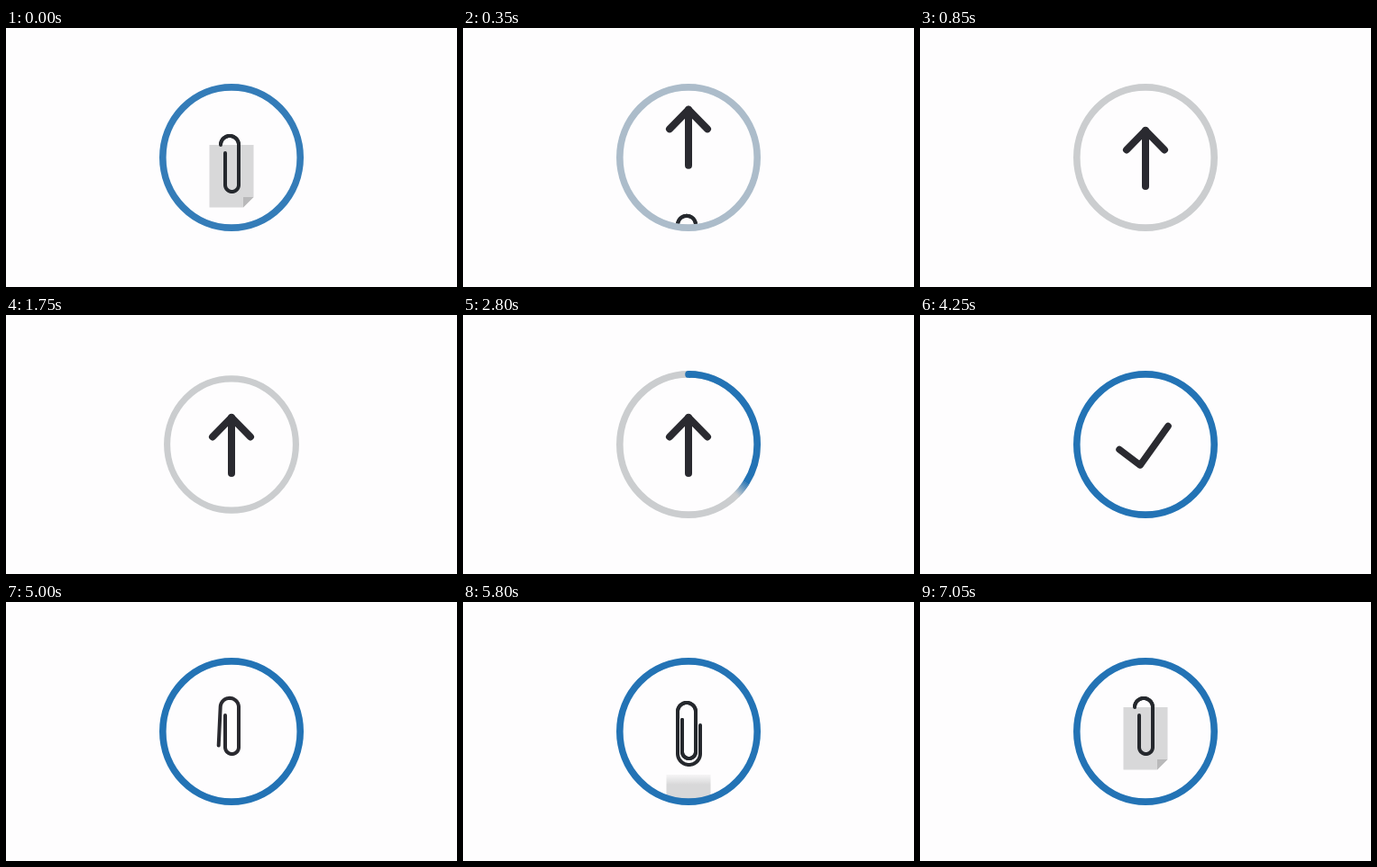
These frames come from a looping animation (500x288 px, 7.1 s). An HTML page with a canvas:

```html
<!DOCTYPE html>
<html lang="en">
<head>
<meta charset="utf-8">
<title>Attachment upload</title>
<style>
html, body { margin: 0; width: 100%; height: 100%; overflow: hidden; background: #fefdfe; }
canvas { display: block; }
</style>
</head>
<body>
<canvas id="stage" width="500" height="288"></canvas>
<script>
const ctx = document.getElementById('stage').getContext('2d');
const LOOP = 7100, CX = 250, CY = 144, RADIUS = 76.2, STRETCH = 1.025;
const BG = '#fefdfe', INK = '#2a2a30', CLIP_INK = '#25282d';
const BLUE = [35, 115, 181], GREY = [203, 205, 207];
const TAU = Math.PI * 2, SCROLL = 125;

// Clip as a spiral of [length, turn] pieces, from the inner end outwards
const CLIP = [
  [35.5, 0], [7.5 * Math.PI, -Math.PI], [44.5, 0], [10 * Math.PI, -Math.PI],
  [46.5, 0], [12.5 * Math.PI, -Math.PI], [31.5, 0]
];
const CLIP_LEN = CLIP.reduce((sum, s) => sum + s[0], 0);
const FRONT_LEN = CLIP.slice(0, 4).reduce((sum, s) => sum + s[0], 0);

const ARROW = [[229, 135.5], [250, 114], [271, 135.5]];
const CHECK = [[221, 149.5], [244, 167], [275, 123.5]];

const lerp = (a, b, k) => a + (b - a) * k;
const part = (t, a, b) => Math.min(1, Math.max(0, (t - a) / (b - a)));
const sine = u => 0.5 - 0.5 * Math.cos(Math.PI * u);
const rgb = c => `rgb(${c.map(Math.round).join(',')})`;
const mix = (a, b, k) => rgb(a.map((v, i) => lerp(v, b[i], k)));

// cubic-bezier(.25, .1, .25, 1)
function ease(x) {
  let lo = 0, hi = 1;
  const at = (p, a, b) => 3 * p * (1 - p) ** 2 * a + 3 * p * p * (1 - p) * b + p ** 3;
  for (let i = 0; i < 24; i++) {
    const m = (lo + hi) / 2;
    if (at(m, 0.25, 0.25) < x) lo = m; else hi = m;
  }
  return at(lo, 0.1, 1);
}

function stroke(points, color, width) {
  ctx.beginPath();
  points.forEach(p => ctx.lineTo(p[0], p[1]));
  ctx.strokeStyle = color;
  ctx.lineWidth = width;
  ctx.lineCap = ctx.lineJoin = 'round';
  ctx.stroke();
}

function trace(x, y, heading, pieces, limit) {
  const pts = [[x, y]];
  for (const [len, turn] of pieces) {
    const n = turn ? 24 : 1;
    for (let i = 0; i < n && limit > 0; i++) {
      const step = Math.min(len / n, limit);
      const dir = heading + turn / n / 2;
      x += Math.cos(dir) * step;
      y += Math.sin(dir) * step;
      heading += turn / n;
      limit -= len / n;
      pts.push([x, y]);
    }
  }
  return pts;
}

function drawClip(dy, limit = CLIP_LEN) {
  stroke(trace(243, 126 + dy, Math.PI / 2, CLIP, limit), CLIP_INK, 4);
}

// The check stands up, its long arm grows and curls into a clip
function drawCheckToClip(t) {
  const bend = sine(part(t, 4300, 4900));
  const curl = sine(part(t, 4420, 5050));
  const grow = sine(part(t, 4350, 5650));
  const [a, b, c] = CHECK;
  const h1 = Math.atan2(b[1] - a[1], b[0] - a[0]);
  const h2 = Math.atan2(c[1] - b[1], c[0] - b[0]);
  const arms = [Math.hypot(b[0] - a[0], b[1] - a[1]), 0.1, Math.hypot(c[0] - b[0], c[1] - b[1])];
  const turns = [0, h2 - h1, 0];
  const pieces = CLIP.map(([len, turn], i) => i < 3
    ? [lerp(arms[i], len, bend), lerp(turns[i], turn, bend)]
    : [len, turn * curl]);
  const base = pieces[0][0] + pieces[1][0] + pieces[2][0];
  const rest = CLIP_LEN - CLIP[0][0] - CLIP[1][0] - CLIP[2][0];
  const pts = trace(lerp(a[0], 243, bend), lerp(a[1], 126, bend),
    lerp(h1, Math.PI / 2, bend), pieces, base + rest * grow);
  stroke(pts, INK, lerp(7.5, 4, bend));
}

function drawArrow(dy, k) {
  const pts = ARROW.map((p, i) => [lerp(p[0], CHECK[i][0], k), lerp(p[1], CHECK[i][1], k) + dy]);
  const end = [lerp(250, CHECK[1][0], k), lerp(176, CHECK[1][1], k) + dy];
  const width = lerp(8, 7.5, k);
  stroke(pts, INK, width);
  stroke([pts[1], end], INK, width);
}

function drawPaper(dy, fade) {
  const l = 225.5, r = 274.5, top = 117 + dy, bottom = 186.5 + dy, fold = 11.5;
  let fill = '#d8d8d9';
  if (fade > 0.5) {
    fill = ctx.createLinearGradient(0, top - 3, 0, top - 3 + fade);
    fill.addColorStop(0, 'rgba(216,216,217,0)');
    fill.addColorStop(1, 'rgb(216,216,217)');
  }
  ctx.fillStyle = fill;
  ctx.beginPath();
  ctx.moveTo(l, top);
  ctx.lineTo(r, top);
  ctx.lineTo(r, bottom - fold);
  ctx.lineTo(r - fold, bottom);
  ctx.lineTo(l, bottom);
  ctx.fill();
  ctx.fillStyle = '#b9b9ba';
  ctx.beginPath();
  ctx.moveTo(r - fold, bottom - fold);
  ctx.lineTo(r, bottom - fold);
  ctx.lineTo(r - fold, bottom);
  ctx.fill();
}

function drawSheet(paperY, clipY, fade) {
  drawClip(clipY);
  drawPaper(paperY, fade);
  drawClip(clipY, FRONT_LEN);
}

function arc(from, to, color, cap) {
  ctx.beginPath();
  ctx.arc(0, 0, RADIUS, from - TAU / 4, to - TAU / 4);
  ctx.strokeStyle = color;
  ctx.lineCap = cap;
  ctx.stroke();
}

function drawRing(t, fade) {
  const press = ease(part(t, 1610, 1870)) - sine(part(t, 1960, 2250));
  const size = 1 - 0.075 * press;
  ctx.save();
  ctx.translate(CX, CY);
  ctx.scale(size, size * STRETCH);
  ctx.lineWidth = 7.6;
  const u = part(t, 1990, 4000);
  const angle = TAU * (u + sine(u)) / 2;
  if (u === 1) {
    arc(0, TAU, rgb(BLUE), 'butt');
  } else {
    arc(0, TAU, mix(BLUE, GREY, fade), 'butt');
    if (angle > 0) {
      const tail = Math.min(0.22, angle), n = 12;
      arc(0, Math.max(0.001, angle - tail), rgb(BLUE), 'butt');
      for (let i = 0; i < n; i++) {
        const from = angle - tail + tail * i / n;
        arc(from, from + tail / n, mix(BLUE, GREY, (i + 0.5) / n), 'butt');
      }
      arc(0, 0.001, rgb(BLUE), 'round');
    }
  }
  ctx.restore();
}

function drawContent(t, scroll) {
  if (t < 4250) {
    if (t < 1000) drawSheet(scroll * SCROLL, scroll * SCROLL, 0);
    drawArrow((scroll - 1) * SCROLL, sine(part(t, 3800, 4200)));
  } else if (t < 5700) {
    drawCheckToClip(t);
  } else {
    const rise = part(t, 5720, 6110);
    const y = lerp(115, -10, Math.sin(rise * Math.PI / 2)) + 10 * sine(part(t, 6110, 6650));
    drawSheet(y, Math.min(5, y), 18 * (1 - rise));
  }
}

function draw(t) {
  const scroll = ease(part(t, -90, 770));
  ctx.fillStyle = BG;
  ctx.fillRect(0, 0, 500, 288);
  ctx.save();
  ctx.beginPath();
  ctx.ellipse(CX, CY, RADIUS - 2, (RADIUS - 2) * STRETCH, 0, 0, TAU);
  ctx.clip();
  drawContent(t, scroll);
  ctx.restore();
  drawRing(t, scroll);
}

const start = performance.now();
function tick() {
  draw((performance.now() - start) % LOOP);
  requestAnimationFrame(tick);
}
tick();
</script>
</body>
</html>
```
